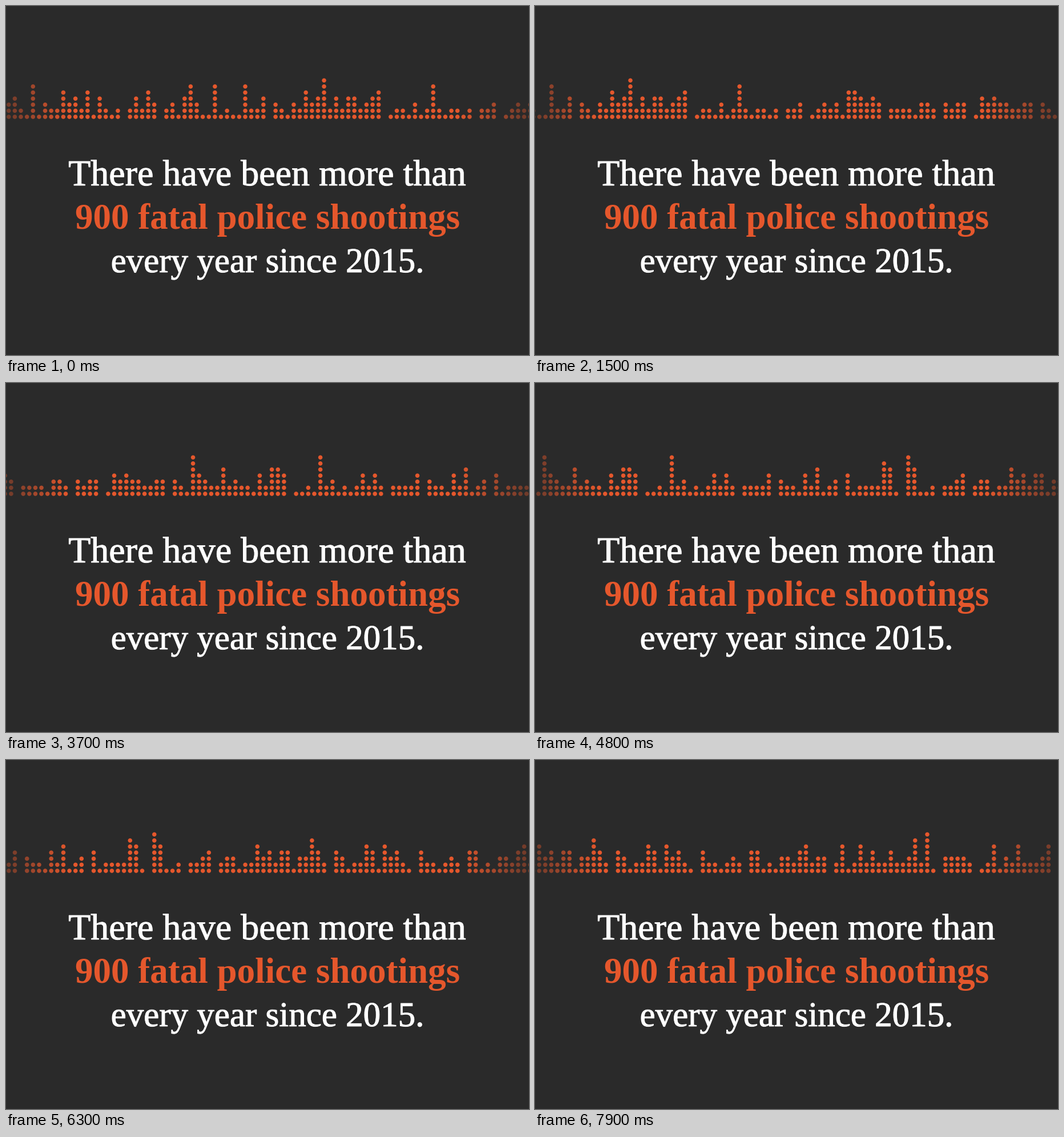
Animation, 916 px wide and 611 px high, one loop 8000 ms. Source, as a matplotlib script:

```python
import numpy as np
import matplotlib.pyplot as plt
from matplotlib.animation import FuncAnimation
from matplotlib.colors import to_rgba
from matplotlib.patheffects import withStroke

W, H, DPI = 916, 611, 100
BG, ORANGE, WHITE = "#2a2a2a", "#e5572c", "#ffffff"
PITCH, FIRST_X, BASE_Y = 10.62, 4.8, 194
DOT = 7.5
COLUMNS = 287
FRAMES, STEP_MS = 80, 100

# The tallest columns, by height in dots.
PEAKS = {6: [4, 30, 34, 39, 70, 179, 209, 262],
         7: [52, 123, 144, 183, 264]}


def skyline():
    """Uneven seeded columns, broken by gaps, with the peaks on top."""
    rng = np.random.default_rng(15)
    heights = rng.choice([1, 2, 3, 4, 5], COLUMNS,
                         p=[0.25, 0.33, 0.21, 0.14, 0.07])
    gaps = np.cumsum(rng.integers(4, 20, COLUMNS))
    heights[gaps[gaps < COLUMNS]] = 0
    for height, cols in PEAKS.items():
        heights[cols] = height
    return heights


def scroll(ms):
    return np.interp(ms, [0, 1500, 2800, 3700, 4800, 6300, 7900],
                     [0, 390, 748.5, 983.5, 1294.5, 1688.5, 2121.5])


def edge_fade(x):
    return np.interp(x, [0, 110, 790, 910], [0.36, 1, 1, 0.38])


def px(size):
    return size * 72 / DPI


fig = plt.figure(figsize=(W / DPI, H / DPI), dpi=DPI, facecolor=BG)
ax = fig.add_axes([0, 0, 1, 1])
ax.set_xlim(0, W)
ax.set_ylim(H, 0)
ax.axis("off")


def headline(text, y, size, color, weight="normal", stroke=0):
    label = ax.text(W / 2, y, text, color=color, fontsize=px(size),
                    family="Liberation Serif", weight=weight,
                    ha="center", va="baseline")
    if stroke:
        label.set_path_effects(
            [withStroke(linewidth=px(stroke), foreground=color)])


headline("There have been more than", 314, 64, WHITE, stroke=1)
headline("900 fatal police shootings", 390, 63, ORANGE, weight="bold")
headline("every year since 2015.", 466, 61, WHITE, stroke=1)

heights = skyline()
cols = np.repeat(np.arange(COLUMNS), heights)
rows = np.concatenate([np.arange(h) for h in heights])
dot_x = FIRST_X + PITCH * cols
dot_y = BASE_Y - PITCH * rows
rgba = np.tile(to_rgba(ORANGE), (len(cols), 1))
dots = ax.scatter(dot_x, dot_y, s=px(DOT) ** 2, c=rgba, linewidths=0)


def draw(frame):
    x = dot_x - scroll(frame * STEP_MS)
    rgba[:, 3] = edge_fade(x)
    dots.set_offsets(np.column_stack([x, dot_y]))
    dots.set_facecolor(rgba)
    return [dots]


anim = FuncAnimation(fig, draw, frames=FRAMES, interval=STEP_MS, repeat=True,
                     repeat_delay=0)
plt.show()
```
